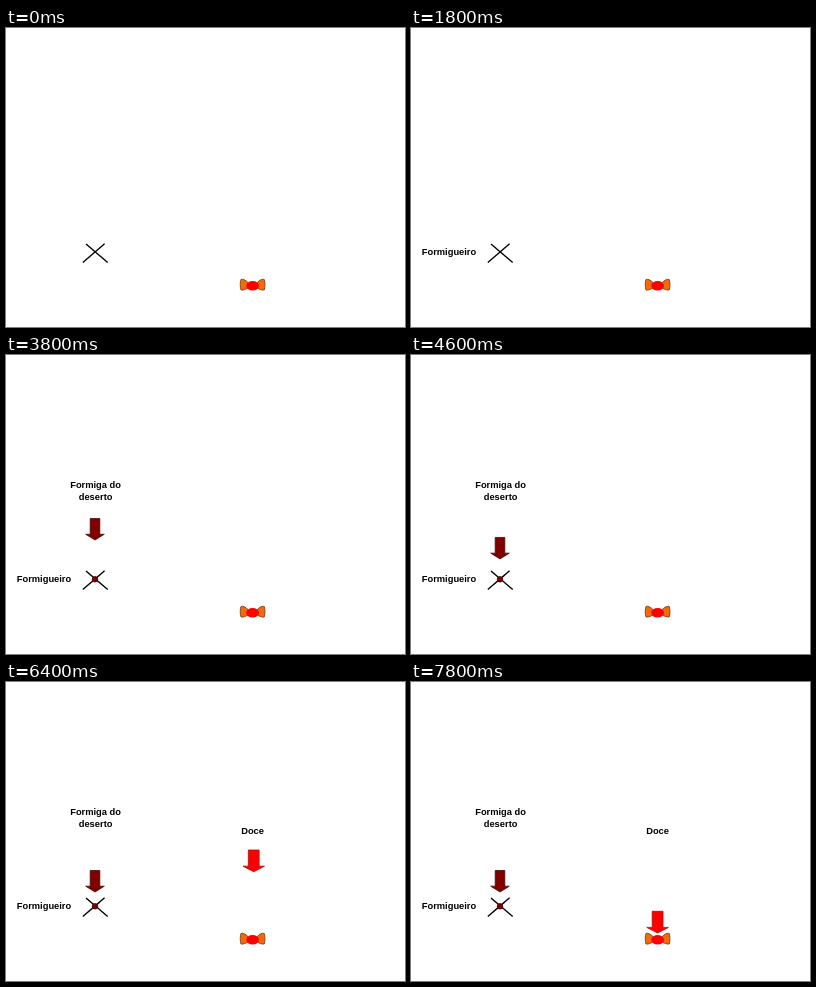
Animation, 399 px wide and 299 px high, one loop 8 s. Source, as an HTML page:

```html
<!DOCTYPE html>
<html lang="pt">
<head>
<meta charset="utf-8">
<title>Formiga do deserto</title>
<style>
  html, body { margin: 0; width: 100%; height: 100%; overflow: hidden; background: #fff; }
  svg { display: block; width: 399px; height: 299px; }
  text { font: bold 9.33px "Liberation Sans", Arial, sans-serif; text-anchor: middle; }
</style>
</head>
<body>
<svg viewBox="0 0 399 299">
  <path d="M80 216 L101.7 234.5 M98.6 215.8 L76.8 234.5" stroke="#000" stroke-width="1.4" fill="none"/>
  <circle id="nest" cx="89" cy="224.3" r="2.8" fill="#800000" stroke="#300" stroke-width=".7"/>

  <g id="nestLabel">
    <text x="38" y="227.4">Formigueiro</text>
    <g id="cover" fill="#fff"></g>
  </g>

  <g id="antLabel">
    <text x="89.6" y="132.6">Formiga do</text>
    <text x="89.6" y="144.6">deserto</text>
  </g>
  <text id="candyLabel" x="246.6" y="151.6">Doce</text>

  <g stroke="#8a4a1c" stroke-width="1" fill="#f4690c">
    <path id="wing" d="M242 254.6 C239.5 252 237 250.8 235 251.4 C234 254 234 259 235 262 C237.5 262.4 239.5 261.2 242 260 Z"/>
    <use href="#wing" transform="translate(493.2 0) scale(-1 1)"/>
  </g>
  <ellipse cx="246.6" cy="257.8" rx="6.4" ry="4.8" fill="#f00"/>

  <path id="antArrow" d="M-4.8 .5 H4.8 V16.2 H9.3 L0 22 L-9.3 16.2 H-4.8 Z"
        fill="#800000" stroke="#4a0808" stroke-width=".8"/>
  <path id="candyArrow" d="M-5.4 .5 H5.4 V16.6 H10.8 L0 22.2 L-10.8 16.6 H-5.4 Z"
        fill="#f00" stroke="#a81010" stroke-width=".8"/>
</svg>
<script>
const LOOP = 8000, STEP = 200, CELL = 2;
const el = id => document.getElementById(id);
const show = (id, on) => el(id).setAttribute("visibility", on ? "visible" : "hidden");
const ease = u => { u = Math.min(1, Math.max(0, u)); return u * u * (3 - 2 * u); };

// White cells over the label, each lifted at its own threshold
let seed = 7;
const random = () => (seed = seed * 16807 % 2147483647) / 2147483647;
const cells = [];
for (let y = 218; y < 230; y += CELL) {
  for (let x = 9; x < 67; x += CELL) {
    const rect = document.createElementNS("http://www.w3.org/2000/svg", "rect");
    rect.setAttribute("x", x);
    rect.setAttribute("y", y);
    rect.setAttribute("width", CELL);
    rect.setAttribute("height", CELL);
    rect.setAttribute("shape-rendering", "crispEdges");
    el("cover").append(rect);
    cells.push({ rect, threshold: random() });
  }
}

const arrows = [
  { id: "antArrow", start: 3400, time: 1700, from: [89, 159], to: [89, 188] },
  { id: "candyArrow", start: 6000, time: 1800, from: [247.9, 158.7], to: [246.6, 228.8] }
];

function draw(t) {
  const shown = t < 1200 ? 0 : Math.min(1, .28 + (t - 1200) / 600 * .72);
  show("nestLabel", shown > 0);
  for (const c of cells) c.rect.setAttribute("display", c.threshold < shown ? "none" : "inline");
  show("nest", t >= 2800);
  show("antLabel", t >= 3400);
  show("candyLabel", t >= 6000);
  for (const a of arrows) {
    show(a.id, t >= a.start);
    const k = ease((t - a.start) / a.time);
    const [x, y] = a.from.map((v, i) => v + (a.to[i] - v) * k);
    el(a.id).setAttribute("transform", `translate(${x} ${y})`);
  }
}

const begin = performance.now();
function tick() {
  const t = (performance.now() - begin) % LOOP;
  draw(Math.floor(t / STEP) * STEP);
  requestAnimationFrame(tick);
}
tick();
</script>
</body>
</html>
```
